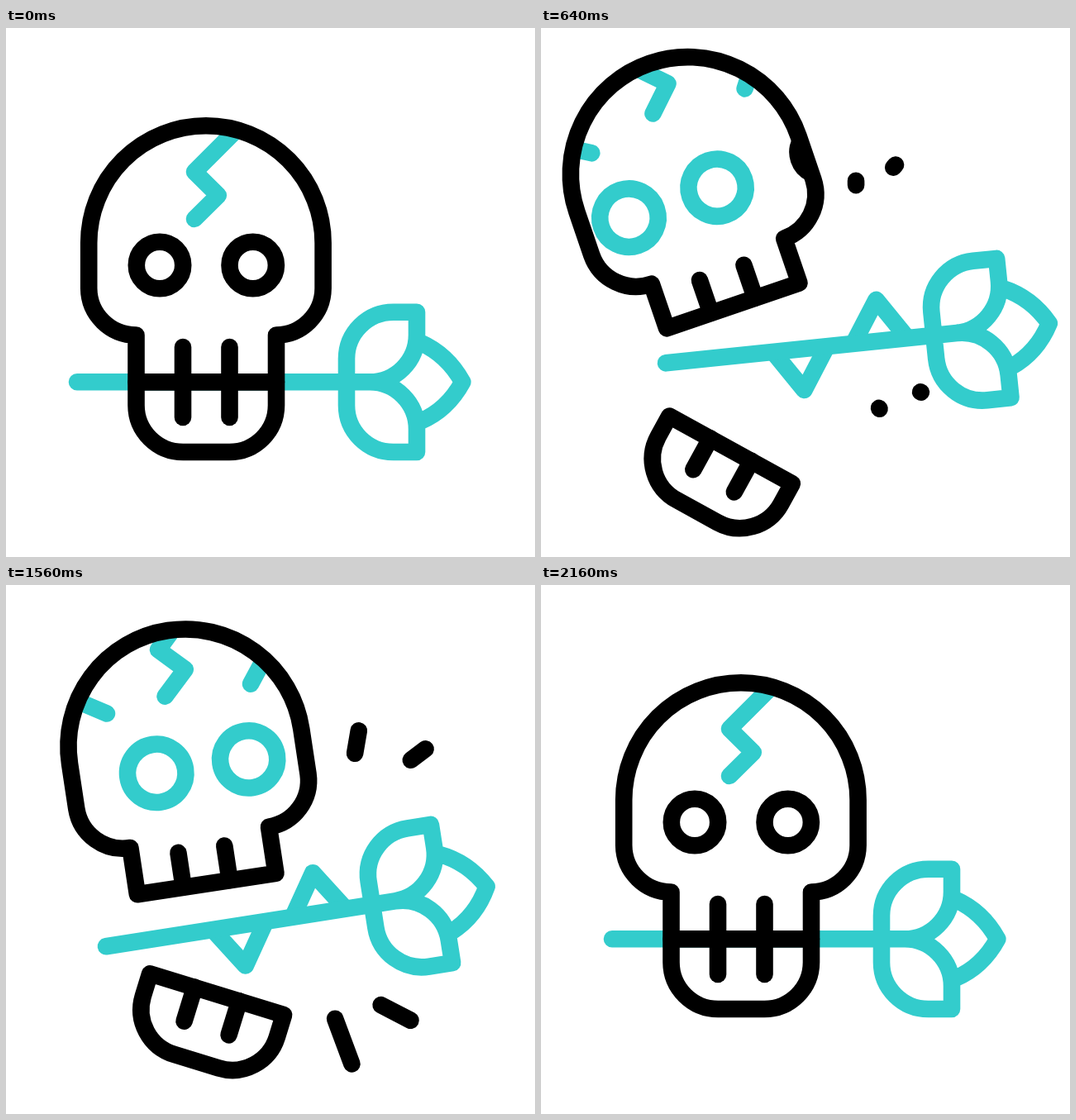
Animation, 640 px wide and 640 px high, one loop 2.6 s. Source, as an HTML page with a canvas:

```html
<!DOCTYPE html>
<html lang="en">
<head>
<meta charset="utf-8">
<title>Skull and rose</title>
<style>
  html, body { margin: 0; width: 100%; height: 100%; overflow: hidden; background: #fff; }
  canvas { display: block; width: 100vmin; height: 100vmin; }
</style>
</head>
<body>
<canvas id="stage" width="640" height="640"></canvas>
<script>
const ctx = document.getElementById('stage').getContext('2d');
const LOOP = 2600, STEP = 40;
const BLACK = '#000', TEAL = '#33cccc';

// Eased progress from time a to time b, slow at both ends.
function ease(t, a, b, power = 4) {
  const u = Math.min(1, Math.max(0, (t - a) / (b - a)));
  return u < 0.5 ? Math.pow(2 * u, power) / 2 : 1 - Math.pow(2 - 2 * u, power) / 2;
}
const mix = (a, b, p) => a + (b - a) * p;
const closing = t => ease(t, 1470, 2160);

// Poses are [dx, dy, degrees]: the widest swing, then the settled one.
const POSES = {
  skull: { pivot: [242, 428], wide: [-10, -92.3, -18.9], open: [0.4, -66.9, -9.1] },
  jaw: { pivot: [242, 428], wide: [-12.5, 82, 28.8], open: [13, 67, 17.15] },
  stem: { pivot: [86, 428], wide: [65, -23, -5.9], open: [35, 9, -8.95] }
};

function inPose(name, t, draw) {
  const { pivot: [px, py], wide, open } = POSES[name];
  const swing = ease(t, 120, 600, 3);
  const settle = ease(t, 600, 1240, 3);
  const close = closing(t);
  const turnBack = name === 'skull' ? ease(t, 1360, 2057) : close;
  const [dx, dy, deg] = wide.map((w, i) =>
    mix(w * swing, open[i], settle) * (1 - (i === 2 ? turnBack : close)));
  ctx.save();
  ctx.translate(px + dx, py + dy);
  ctx.rotate(deg * Math.PI / 180);
  ctx.translate(-px, -py);
  draw(t);
  ctx.restore();
}

function stroke(path, color) {
  ctx.strokeStyle = color;
  ctx.stroke(path);
}
function line(color, ...pts) {
  ctx.beginPath();
  for (let i = 0; i < pts.length; i += 2) ctx.lineTo(pts[i], pts[i + 1]);
  ctx.strokeStyle = color;
  ctx.stroke();
}
function ring(x, y, r, color) {
  ctx.beginPath();
  ctx.arc(x, y, r, 0, 2 * Math.PI);
  ctx.strokeStyle = color;
  ctx.stroke();
}

const skullShape = new Path2D('M157.5 428.3V371.5A57 57 0 0 1 100.2 315V260' +
  'A141.7 141.7 0 0 1 383.6 260V315A57 57 0 0 1 327 371.5V428.3Z');
const jawShape = new Path2D('M157.5 428.3V456.5A56.7 56.7 0 0 0 214.2 513' +
  'H270.3A56.7 56.7 0 0 0 327 456.5V428.3Z');
const roseShape = new Path2D('M86 428.3H440' +
  'M412 428.3V400A56.5 56.5 0 0 1 468.5 343.7H497V371.5A57 57 0 0 1 440 428.3' +
  'A57 57 0 0 1 497 485.3V513H468.5A56.5 56.5 0 0 1 412 456.5Z' +
  'M501 380.5Q534 395 552.3 428.3Q534 462 501 476');

function thorn(x, side, raise) {
  const tip = 428.3 + side * mix(-10, 50, raise);
  ctx.save();
  ctx.beginPath();
  ctx.rect(0, side < 0 ? -200 : 428, 640, 628);
  ctx.clip();
  line(TEAL, x - 33, tip - side * 50, x, tip, x + 33, tip - side * 50);
  ctx.restore();
}

function drawStem(t) {
  const down = ease(t, 1420, 2100);
  if (t > 160 && down < 1) {
    thorn(347, -1, ease(t, 160, 700) - down);
    thorn(249.2, 1, ease(t, 180, 730) - down);
  }
  stroke(roseShape, TEAL);
}

function drawJaw() {
  for (const x of [214, 270.5]) line(BLACK, x, 428, x, 471);
  stroke(jawShape, BLACK);
}

function eyes(shift, drop, color, left, right) {
  ring(186 + shift, 287 + drop, left, color);
  ring(298.7 + shift, 287 + drop, right, color);
}

function drawEyes(t) {
  let dark, light, drop = 0;
  if (t < 1360) {
    dark = 245.5 * ease(t, 160, 895);
    light = dark - 245.5;
  } else {
    light = 304 * ease(t, 1360, 2057);
    dark = light - 304;
    drop = -0.05 * dark;
  }
  eyes(light, 0, TEAL, 35.2, 34.6);
  eyes(dark, drop, BLACK, 28.2, 28.2);
}

function drawCracks(t) {
  const lift = mix(54 * ease(t, 160, 660, 3), 34.6, ease(t, 600, 1240, 3)) * (1 - closing(t));
  const x = -0.04 * lift, y = -lift;
  line(TEAL, 328 + x, 74 + y, 228 + x, 174 + y, 256.8 + x, 202.5 + y, 228 + x, 231 + y);

  const out = 50 * (1 - ease(t, 300, 900, 3) + ease(t, 1440, 2140));
  for (const [x0, y0, ux, uy] of [[154, 206.7, -0.85, -0.52], [331, 197.5, 0.6, -0.8]]) {
    line(TEAL, x0 + ux * out, y0 + uy * out, x0 + ux * (out + 60), y0 + uy * (out + 60));
  }
}

// A dash grows from its near end, later shrinks towards its far end.
function dash(x1, y1, x2, y2, head, tail) {
  if (head < 0.004 || tail > 0.99) return;
  line(BLACK, mix(x1, x2, tail), mix(y1, y2, tail), mix(x1, x2, head), mix(y1, y2, head));
}

function drawDashes(t) {
  const headUp = ease(t, 440, 1080), tailUp = ease(t, 1360, 1740);
  const headLow = ease(t, 515, 1115), tailLow = ease(t, 1360, 1900);
  dash(430.2, 338.5, 452, 272.7, headUp, tailUp);
  dash(479.8, 332.8, 528.6, 306.6, headUp, tailUp);
  dash(423, 600.6, 461.6, 628.6, headLow, tailLow);
  dash(369.3, 602.8, 383.4, 670, headLow, tailLow);
}

function drawSkull(t) {
  ctx.save();
  ctx.clip(skullShape);
  drawCracks(t);
  drawEyes(t);
  ctx.restore();
  for (const x of [214, 270.5]) line(BLACK, x, 386, x, 428);
  stroke(skullShape, BLACK);
  drawDashes(t);
}

function render(t) {
  ctx.fillStyle = '#fff';
  ctx.fillRect(0, 0, 640, 640);
  ctx.lineWidth = 20.6;
  ctx.lineCap = ctx.lineJoin = 'round';
  inPose('stem', t, drawStem);
  inPose('jaw', t, drawJaw);
  inPose('skull', t, drawSkull);
}

const start = performance.now();
function tick() {
  const t = (performance.now() - start) % LOOP;
  render(Math.floor(t / STEP) * STEP);
  requestAnimationFrame(tick);
}
tick();
</script>
</body>
</html>
```
